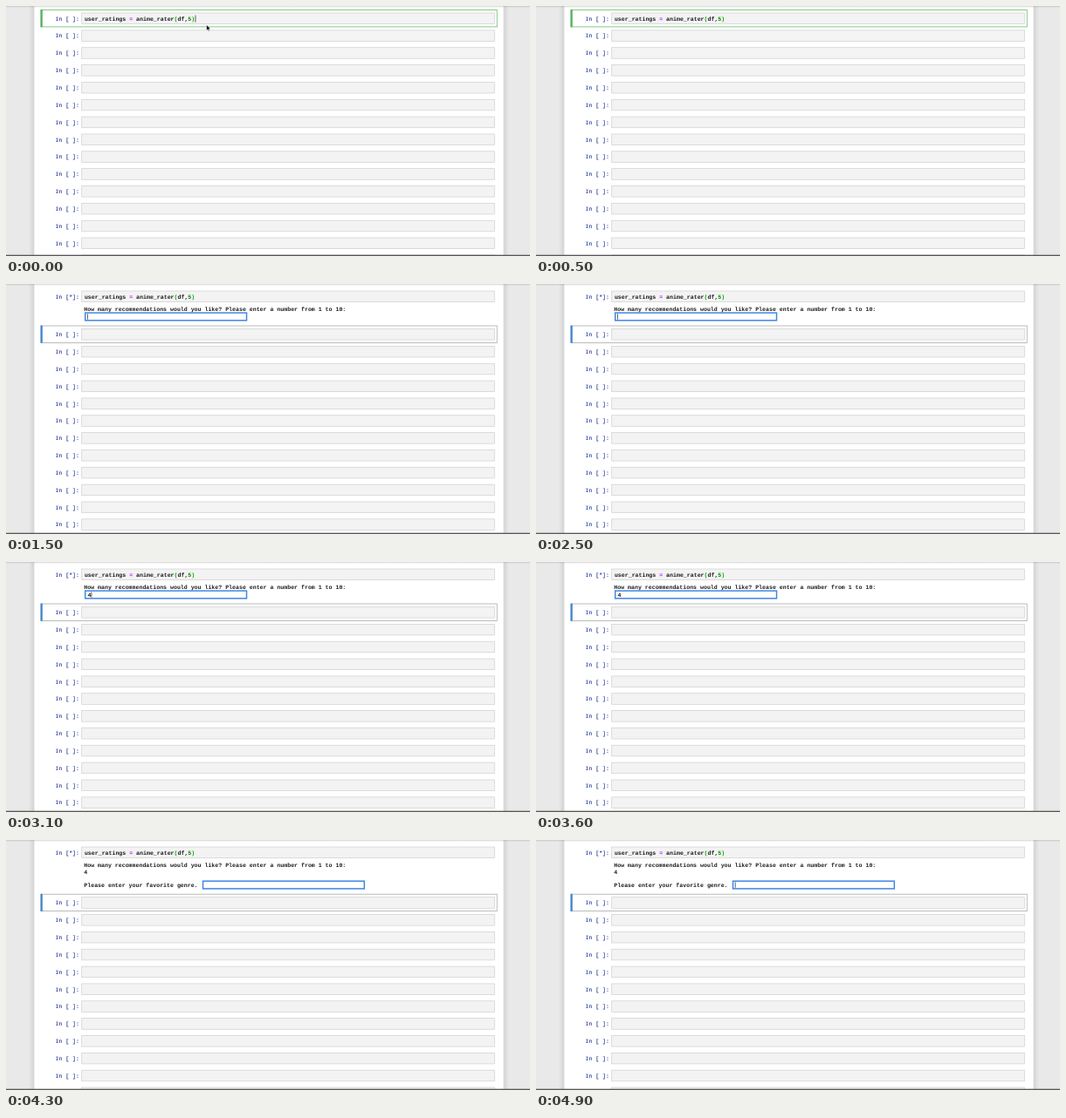
An HTML page for the animation above (5000 ms loop, 600 px wide and 287 px high).

```html
<!DOCTYPE html>
<html lang="en">
<head>
<meta charset="utf-8">
<title>Notebook prompts</title>
<style>
  html, body { margin: 0; width: 100%; height: 100%; overflow: hidden; background: #e9e9e9; }
  svg { display: block; width: 100%; height: 100%; }
  text {
    font: bold 6.58px "Liberation Mono", monospace;
    white-space: pre;
    text-rendering: geometricPrecision;
    fill: #1c1c1c;
  }
  .prompt { font-weight: normal; font-size: 6.5px; fill: #303f9f; stroke: #303f9f; stroke-width: .15; }
  .box { fill: #f3f3f3; stroke: #cfcfcf; stroke-width: .7; }
  .op { fill: #a2f; }
  .num { fill: #080; }
  .bracket { fill: #0a0; }
  .field { fill: #fff; stroke: #3f86e4; stroke-width: 1.5; }
  .caret { fill: #222; }
</style>
</head>
<body>
<svg id="stage" viewBox="0 0 600 287" preserveAspectRatio="none">
  <defs>
    <linearGradient id="shade">
      <stop offset="0" stop-color="#777" stop-opacity="0"/>
      <stop offset="1" stop-color="#777" stop-opacity=".2"/>
    </linearGradient>
    <linearGradient id="top" x2="0" y2="1">
      <stop offset="0" stop-color="#888" stop-opacity=".35"/>
      <stop offset="1" stop-color="#888" stop-opacity="0"/>
    </linearGradient>
  </defs>
  <rect width="600" height="287" fill="#e9e9e9"/>
  <rect x="26" width="6.5" height="287" fill="url(#shade)"/>
  <rect x="26" width="6.5" height="287" fill="url(#shade)" transform="matrix(-1 0 0 1 602 0)"/>
  <rect x="32.5" width="537" height="287" fill="#fff"/>
  <rect width="600" height="2" fill="url(#top)"/>
  <g id="scenes"></g>
  <path id="pointer" d="M229.7 21.8v6.2l1.4-1.3 1 2.1 1-.5-1-2h2z" fill="#000" stroke="#fff" stroke-width=".4"/>
  <rect y="285.7" width="600" height="1.3" fill="#555"/>
</svg>
<script>
const LOOP = 5000, PITCH = 19.85;
const $ = id => document.getElementById(id);

const rect = (cls, x, y, w, h) =>
  `<rect class="${cls}" x="${x}" y="${y}" width="${w}" height="${h}"/>`;
const text = (x, y, content, cls = '') =>
  `<text class="${cls}" x="${x}" y="${y}">${content}</text>`;
const span = (cls, content) => `<tspan class="${cls}">${content}</tspan>`;

// A cell is placed by the vertical centre of its input box.
const cell = (cy, mark = ' ') =>
  rect('box', 86.7, cy - 6.5, 472.6, 12.6) + text(56.6, cy + 2.1, `In [${mark}]:`, 'prompt');

const frame = (cy, line, bar) =>
  `<rect x="40" y="${cy - 10}" width="522.2" height="19.4" fill="#fff" stroke="${line}" stroke-width=".8"/>` +
  `<rect x="39.6" y="${cy - 10.4}" width="2.2" height="20.2" fill="${bar}"/>`;

function emptyCells(first) {
  let out = '';
  for (let cy = first; cy < 296; cy += PITCH) out += cell(cy);
  return out;
}

const code = text(89.9, 16.8, 'user_ratings ' + span('op', '=') + ' anime_rater' +
  span('bracket', '(') + 'df,' + span('num', '5') + span('bracket', ')'));
const question = text(89.3, 31, 'How many recommendations would you like? Please enter a number from 1 to 10:');
const waiting = first =>
  cell(14.5, '*') + code + question + frame(first, '#ababab', '#4285d0') + emptyCells(first);
const field = (x, y) => rect('field', x, y, 184.8, 8.7);

const scenes = [
  { start: 0, end: 1500, body: frame(14.5, '#66bb6a', '#58b15c') + cell(14.5) + code + emptyCells(14.5 + PITCH) },
  { start: 1500, end: 3800, body: waiting(58) + field(90.7, 33.1) },
  { start: 3800, end: LOOP, body: waiting(72.2) + text(89.3, 39.2, '4') +
      text(89.3, 54, 'Please enter your favorite genre.') + field(225.5, 47.2) },
  { start: 3100, end: 3800, body: text(93.4, 39.7, '4') }
];

const caret = (x, y, h, start, end) => ({ start, end, body: rect('caret', x, y, .7, h) });
scenes.push(
  caret(216.6, 10.6, 8, 0, 500),
  caret(216.6, 10.6, 8, 1000, 1500),
  caret(93, 34.3, 6.4, 1500, 2000),
  caret(93, 34.3, 6.4, 2500, 3000),
  caret(97.6, 34.3, 6.4, 3100, 3600),
  caret(227.8, 48.4, 6.4, 3800, 4300),
  caret(227.8, 48.4, 6.4, 4800, LOOP)
);

$('scenes').innerHTML = scenes.map(s => `<g>${s.body}</g>`).join('');
const layers = [...$('scenes').children];

function draw(t) {
  scenes.forEach((s, i) => {
    layers[i].style.display = t >= s.start && t < s.end ? '' : 'none';
  });
  $('pointer').style.opacity = Math.max(0, 1 - Math.floor(t / 100) / 5);
}

const origin = performance.now();
function tick() {
  draw((performance.now() - origin) % LOOP);
  requestAnimationFrame(tick);
}
tick();
</script>
</body>
</html>
```
